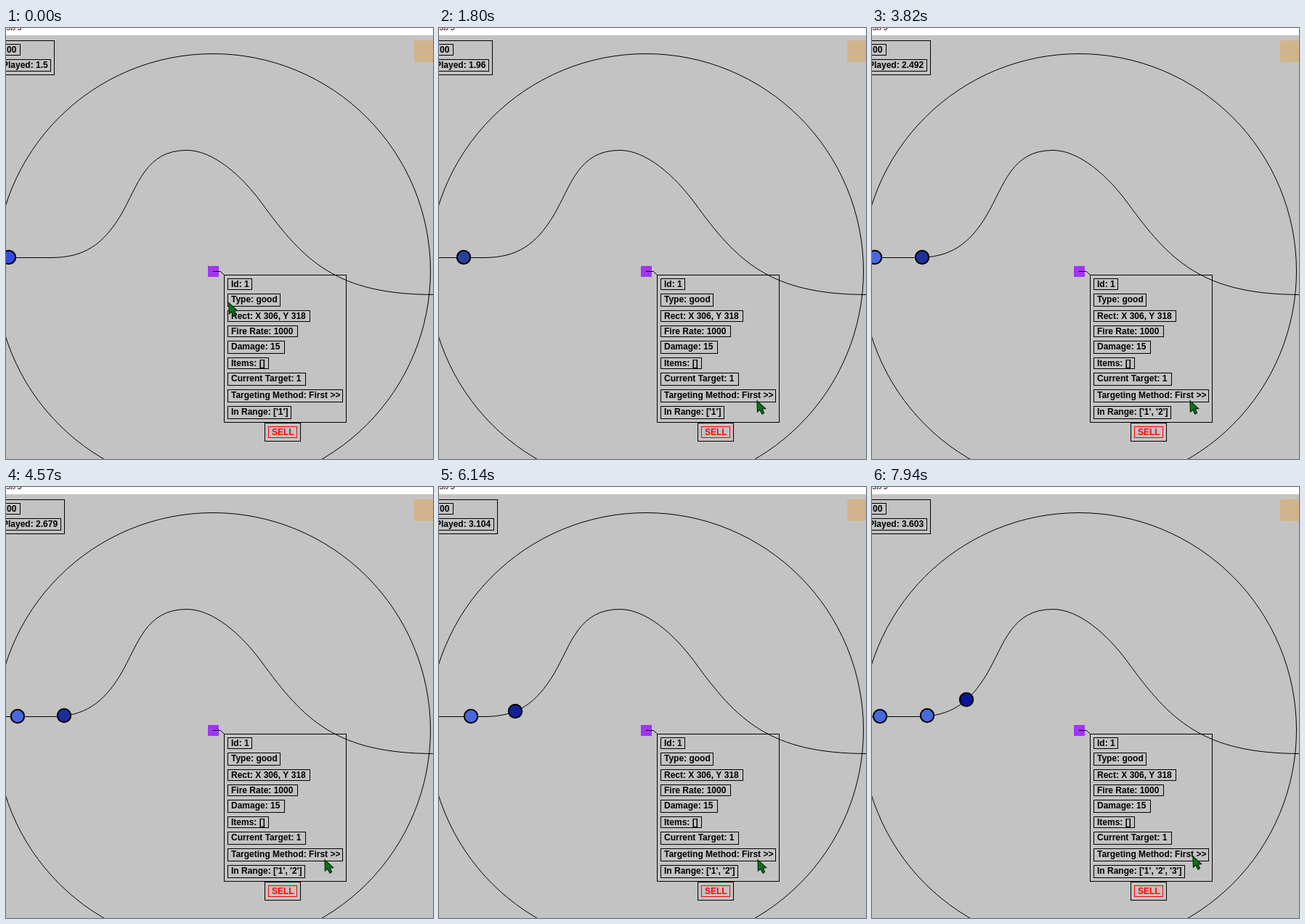
An HTML page with a canvas that plays this animation: 588x594 px, repeating every 8 s.

```html
<!DOCTYPE html>
<html lang="en">
<head>
<meta charset="utf-8">
<title>Tower range</title>
<style>
  html, body { margin: 0; width: 100%; height: 100%; overflow: hidden; background: #c3c3c3; }
  canvas { display: block; }
</style>
</head>
<body>
<canvas id="stage" width="588" height="594"></canvas>
<script>
const ctx = document.getElementById('stage').getContext('2d', { alpha: false });
const LOOP = 8000;
const TICK = 65;
const SPEED = 65.6;
const SPACING = 65.5;
const TOWER = { x: 285, y: 335, range: 299.5 };

// The track starts off stage, so length along it is x + LEAD_IN on the flat part
const LEAD_IN = 200;
const FLAT_END = 69;
const CLIMB_RATE = .92;
const trackShape = `M${-LEAD_IN} 316.5 H62 C108 316.5 134 298 158 258
  C182 217 192 168.5 249 168.5 C285 168.5 324 203 352 241 C410 321 455 367.5 590 367.5`;
const track = new Path2D(trackShape);
const ruler = document.createElementNS('http://www.w3.org/2000/svg', 'path');
ruler.setAttribute('d', trackShape);

// Time in ms to game seconds: the game slows and catches up a little
const clock = [[0, 1.5], [820, 1.715], [2770, 2.204], [3820, 2.492],
  [5460, 2.918], [6650, 3.253], [7940, 3.603]];
const pointer = [[100, 306, 378], [820, 421, 485], [1700, 437, 513], [6990, 438, 513], [7700, 441, 508]];
const facts = [
  ['Id: 1', 33], ['Type: good', 72], ['Rect: X 306, Y 318', 113], ['Fire Rate: 1000', 96],
  ['Damage: 15', 78], ['Items: []', 56], ['Current Target: 1', 107], ['Targeting Method: First >>', 158]
];

// Values between key points; with a tick, they advance in equal steps
function tween(keys, time, tick = 0) {
  const next = keys.findIndex(key => key[0] > time);
  if (next === 0) return keys[0].slice(1);
  if (next < 0) return keys[keys.length - 1].slice(1);
  const a = keys[next - 1], b = keys[next];
  let part = (time - a[0]) / (b[0] - a[0]);
  if (tick) {
    const steps = Math.round((b[0] - a[0]) / tick);
    part = Math.floor(part * steps) / steps;
  }
  return a.slice(1).map((v, i) => v + (b[i + 1] - v) * part);
}

function box(x, y, w, h, color = '#000') {
  ctx.strokeStyle = color;
  ctx.lineWidth = 1;
  ctx.strokeRect(x + .5, y + .5, w, h);
}

function label(text, x, y, color = '#000') {
  ctx.fillStyle = color;
  ctx.fillText(text, x, y);
}

function fill(color, x, y, w, h) {
  ctx.fillStyle = color;
  ctx.fillRect(x, y, w, h);
}

function polyline(points) {
  ctx.beginPath();
  points.forEach(([x, y]) => ctx.lineTo(x, y));
}

function outline(color, width) {
  ctx.strokeStyle = color;
  ctx.lineWidth = width;
  ctx.stroke();
}

function drawEnemy(distance, color) {
  const climb = Math.max(0, distance - FLAT_END);
  const { x, y } = ruler.getPointAtLength(LEAD_IN + distance - climb * (1 - CLIMB_RATE));
  ctx.beginPath();
  ctx.arc(Math.round(x), Math.round(y - .5), 9.2, 0, Math.PI * 2);
  ctx.fillStyle = color;
  ctx.fill();
  outline('#000', 2);
}

// The leader loses its fresh blue at once, then darkens steadily
function leaderColor(played) {
  const fresh = Math.exp(-12 * played);
  const light = 1 - played / 2.1;
  return `rgb(${8 + 44 * light}, ${20 + 54 * light}, ${155 + 68 * fresh})`;
}

function drawStatus(seconds) {
  const value = String(+seconds.toFixed(3));
  const right = 40 + 7 * value.length;
  box(-20, 17, right + 25, 47);
  box(-20, 22, 39, 15);
  label('00', 1, 34);
  box(-20, 43, right + 20, 16);
  label('Played: ' + value, -5, 55);
}

function drawPanel(inRange) {
  polyline([[285, 335.5], [295.5, 335.5], [301, 341]]);
  outline('#000', 1);
  box(300, 340, 168, 203);
  const ids = Array.from({ length: inRange }, (_, i) => `'${i + 1}'`).join(', ');
  let y = 345;
  for (const [text, width] of [...facts, [`In Range: [${ids}]`, 68 + 19 * inRange]]) {
    const height = /[gy]/.test(text) ? 17 : 15;
    box(305, y, width, height);
    label(text, 310, y + 12);
    y += height + 6;
  }
  box(356, 544, 49, 25);
  box(361, 549, 39, 15, '#f00');
  label('SELL', 366, 561, '#f00');
}

function drawPointer([x, y]) {
  ctx.save();
  ctx.translate(Math.round(x) + 1, Math.round(y) + 1);
  polyline([[0, 0], [0.5, 15], [3.5, 12], [7, 18], [9.5, 16.5], [7, 11], [11.5, 10.5]]);
  ctx.closePath();
  ctx.fillStyle = '#0c7420';
  ctx.fill();
  outline('#06300c', 1.3);
  ctx.restore();
}

function draw(time) {
  const [seconds] = tween(clock, time, TICK);
  const played = seconds - clock[0][1];
  const enemies = [0, 1, 2].map(i => 4 + SPEED * played - SPACING * i);
  const inRange = enemies.filter(x => x > -14.5).length;

  fill('#c3c3c3', 0, 0, 588, 594);
  fill('#fff', 0, 0, 588, 10);
  ctx.font = '12px "Liberation Sans", Arial, sans-serif';
  label('gjyg', 0, 0, '#400');
  ctx.font = 'bold 12px "Liberation Sans", Arial, sans-serif';
  fill('#d2b48c', 562, 17, 30, 30);

  ctx.beginPath();
  ctx.arc(TOWER.x, TOWER.y, TOWER.range, 0, Math.PI * 2);
  outline('#000', 1);
  ctx.stroke(track);
  enemies.forEach((x, i) => drawEnemy(x, i ? '#4a67de' : leaderColor(played)));

  fill('#a234f4', TOWER.x - 7, TOWER.y - 7, 15, 15);
  drawStatus(seconds);
  drawPanel(inRange);
  drawPointer(tween(pointer, time));
}

const began = performance.now();
function frame() {
  draw((performance.now() - began) % LOOP);
  requestAnimationFrame(frame);
}
frame();
</script>
</body>
</html>
```
